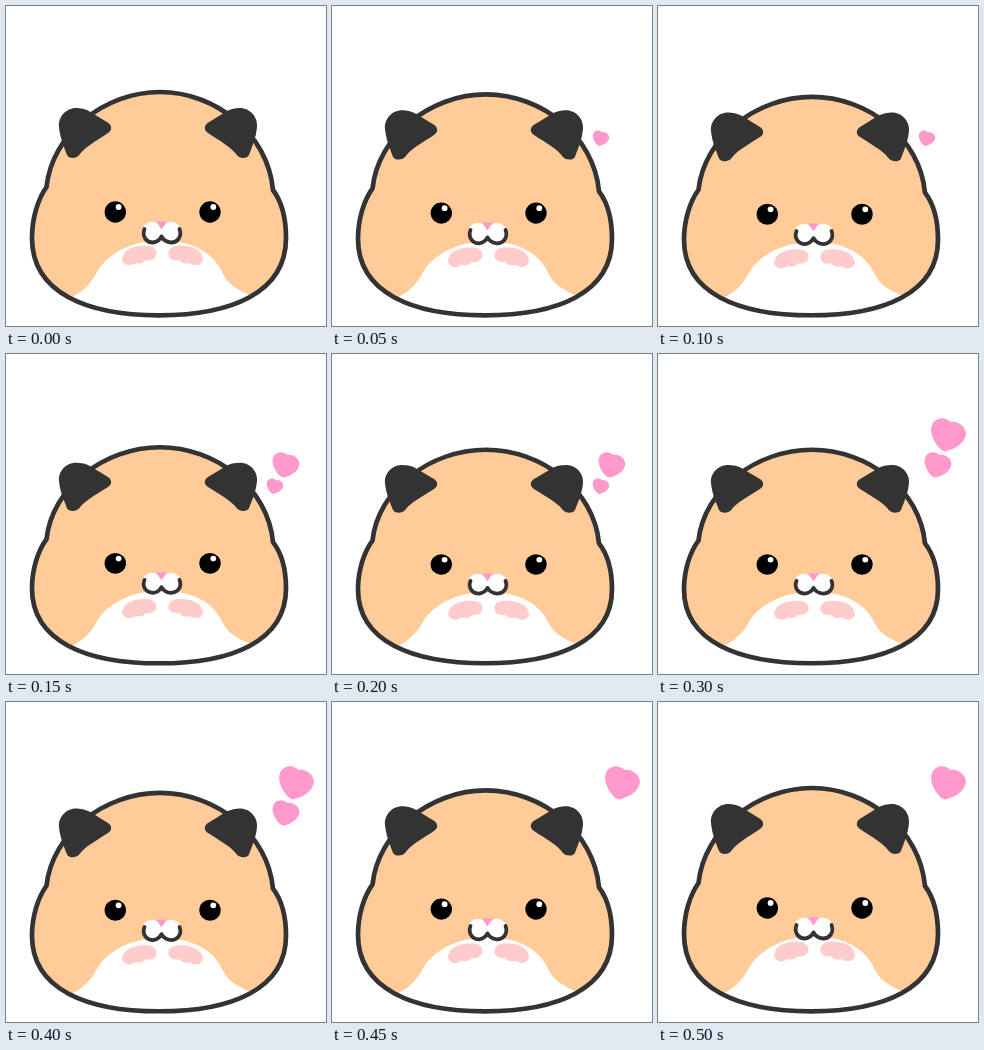
Recreate the animation shown at these times as an HTML page. Size 320 px wide and 320 px high, loop 0.55 s.

```html
<!DOCTYPE html>
<html lang="en">
<head>
<meta charset="utf-8">
<title>Hamster</title>
<style>
html, body { margin: 0; width: 100%; height: 100%; overflow: hidden; background: #fff; }
svg { display: block; width: 100%; height: 100%; }
</style>
</head>
<body>
<svg viewBox="0 0 320 320">
  <defs>
    <path id="body" d="M154 86C210 86 262 128 267 184C276 196 280 214 280 232C280 287 225 309.300 153 309.300C81 309.300 26 287 26 232C26 212 32 193 40.500 181C46 128 98 86 154 86Z"/>
    <clipPath id="inside"><use href="#body"/></clipPath>
    <path id="ear" fill="#333" d="M70 102C60 102 52 111 53 121C54 132 58 141 61 149C63 153 71 153 74 148C79 141 90 135 102 127C106.500 124 106 119.500 102 116.700L85 106.200C80.500 103 75 102 70 102Z"/>
    <path id="paw" fill="#fcc" d="M117 250C119 242 133 238 144 240C153 242 152 253 145 254Q142 255 140 254Q136 259 130 257Q121 262 117 256Q115 253 117 250Z"/>
    <g id="eye"><circle r="10.7"/><circle cx="3.3" cy="-5" r="2.9" fill="#fff"/></g>
    <path id="heart" fill="#f9c" d="M-5 16C-10 14 -17 4 -17.500 -5C-17 -17 -5 -20 2 -13C9.500 -14.500 17.500 -8 17.500 -1C16 9 6 14 -2 16Q-3.500 17 -5 16Z"/>
  </defs>
  <g id="hamster">
    <use href="#body" fill="#fc9"/>
    <path clip-path="url(#inside)" fill="#fff" d="M64 292C78 286 86 276 92 264C104 246 128 234 155 235C185 234 205 246 214 262C220 274 222 280 248 291L240 315H70Z"/>
    <use href="#body" fill="none" stroke="#333" stroke-width="4.7"/>
    <use href="#ear"/>
    <use href="#ear" transform="matrix(-1 0 0 1 304 0)"/>
    <g id="paws">
      <use href="#paw"/>
      <use href="#paw" transform="matrix(-1 0 0 1 313 0)"/>
    </g>
    <use href="#eye" x="109.300" y="206"/>
    <use href="#eye" x="204" y="206"/>
    <g fill="#fff"><ellipse cx="146" cy="225.500" rx="10" ry="9.700"/><ellipse cx="165" cy="225.500" rx="10" ry="9.700"/></g>
    <path fill="#f9c" d="M150 215.500H161L155.500 223.500Z"/>
    <path fill="none" stroke="#333" stroke-width="3.8" stroke-linecap="round" stroke-linejoin="round" d="M138.500 223C135.500 231 141 236.500 147 236.500Q152.500 236 155.500 230.500Q158.500 236 165 236.500C171 236.500 176.500 231 173.500 223"/>
  </g>
  <g id="hearts">
    <use href="#heart" transform="translate(269 132.300) scale(.47)"/>
    <use href="#heart" transform="translate(280 111) scale(.77)"/>
    <use href="#heart" transform="translate(290.500 81)"/>
  </g>
</svg>
<script>
const STEP = 50, STEPS = 11, FLOOR = 310;
// first and last step in which each heart shows, small to large
const spans = [[1, 5], [3, 8], [6, 10]];
const hamster = document.getElementById('hamster');
const paws = document.getElementById('paws');
const hearts = [...document.getElementById('hearts').children];

function draw(now) {
  const step = Math.floor(now / STEP) % STEPS;
  const press = Math.min(step, 10 - step);
  const squash = 1 - 0.0108 * press;
  hamster.setAttribute('transform', `translate(0 ${FLOOR * (1 - squash)}) scale(1 ${squash})`);
  paws.setAttribute('transform', `translate(0 ${1.1 * press})`);
  hearts.forEach((heart, i) => {
    const [first, last] = spans[i];
    heart.style.display = step >= first && step <= last ? '' : 'none';
  });
}

const start = performance.now();
function tick() {
  draw(performance.now() - start);
  requestAnimationFrame(tick);
}
tick();
</script>
</body>
</html>
```
